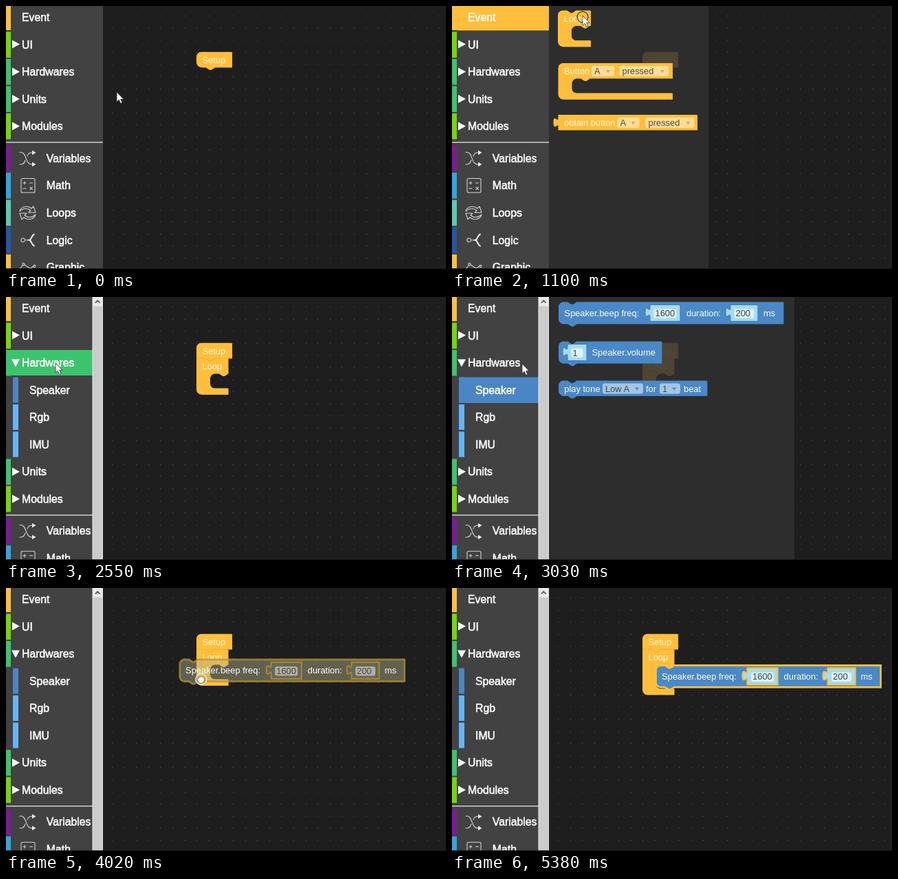
Animation of 640x382 px, one loop 5.75 s. Source, as an HTML page:

```html
<!DOCTYPE html>
<html lang="en">
<head>
<meta charset="utf-8">
<title>Block editor</title>
<style>
html, body { margin: 0; width: 100%; height: 100%; overflow: hidden; background: #1e1e1e; }
svg { display: block; width: 640px; height: 382px; }
text { font-family: "Liberation Sans", Arial, sans-serif; white-space: pre; }
.menu text { font-size: 15.8px; fill: #fff; stroke: #fff; stroke-width: .55px; }
.block text { font-size: 12.9px; }
.icon { fill: none; stroke: #d4d4d4; stroke-width: 1.1; stroke-linecap: round; stroke-linejoin: round; }
</style>
</head>
<body>
<svg id="stage" viewBox="0 0 640 382" xmlns="http://www.w3.org/2000/svg">
  <defs>
    <pattern id="hatch" width="8.8" height="8.8" patternUnits="userSpaceOnUse">
      <rect width="8.8" height="8.8" fill="#aaa"/>
      <path d="M0,0L8.8,8.8M8.8,0L0,8.8" stroke="#cc0" stroke-width=".9"/>
    </pattern>
  </defs>
</svg>
<script>
const LOOP = 5750;
const STEPS = [0, 120, 240, 360, 490, 610, 730, 850, 1100, 1220, 1340, 1460, 1580, 1700,
  1950, 2070, 2190, 2310, 2430, 2550, 2670, 2790, 2910, 3030, 3150, 3270, 3390, 3510,
  3660, 3780, 3900, 4020, 4140, 4260, 4380, 4630, 4750, 4900, 5020, 5140, 5260, 5380];

// time, x, y of the pointer
const PATH = [[0, 161, 125], [610, 98, 20], [730, 98, 20], [850, 190, 17], [1100, 190, 14],
  [1220, 196, 19], [1580, 303, 102], [1700, 305, 103], [1950, 305, 103], [2310, 72, 96],
  [2550, 72, 96], [2790, 77, 136], [2910, 82, 133], [3030, 102, 97], [3390, 186, 36],
  [3510, 186, 36], [3660, 217, 113], [4140, 306, 139], [4380, 311, 141], [4630, 311, 143],
  [4750, 312, 162], [5260, 589, 370], [5380, 640, 400]];

const EVENT = { fill: '#ffbf3c', shade: '#e6ad38', text: '#fff6e0', field: '#ffdc96', ink: '#56503f', mark: '#d3aa5a' };
const SOUND = { fill: '#4a88c8', shade: '#3d72a9', text: '#fff', field: '#a5c5e5', ink: '#3c4650', mark: '#4a88c8',
  num: '#a3dcf6', numField: '#def2fa', rim: '#3f74aa' };
const PICKED = { ...SOUND, stroke: '#ffc235', rim: '#ffc235' };
const GHOST = { fill: 'url(#hatch)', alpha: .46, text: '#fff', stroke: 'rgba(184,146,46,.75)',
  num: 'rgba(115,115,98,.3)', numField: 'rgba(188,188,182,.85)', ink: '#47473f', rim: 'rgba(184,146,46,.75)' };

const stage = document.getElementById('stage');

function add(parent, tag, attrs = {}, content) {
  const el = document.createElementNS('http://www.w3.org/2000/svg', tag);
  for (const k in attrs) el.setAttribute(k, attrs[k]);
  if (content !== undefined) el.textContent = content;
  parent.appendChild(el);
  return el;
}
const group = (parent, x = 0, y = 0, cls = '') =>
  add(parent, 'g', { transform: `translate(${x} ${y})`, class: cls });
const rect = (p, x, y, width, height, fill, rx = 0) => add(p, 'rect', { x, y, width, height, fill, rx });
const path = (p, d, attrs) => add(p, 'path', { d, ...attrs });
const label = (p, x, y, s, fill) => add(p, 'text', { x, y, fill }, s);
const show = (el, on) => el.setAttribute('display', on ? 'inline' : 'none');
const move = (el, x, y) => el.setAttribute('transform', `translate(${x} ${y})`);

// Outline of a block; mouth is the height of the statement opening.
function outline(w, h, { prev, next, mouth, tab, tl = 7, bl = 7 }) {
  let d = `M0,${tl}` + (tl ? `a${tl},${tl} 0 0 1 ${tl},${-tl}` : '');
  if (prev) d += 'H13.2l5.3,3.5h2.6l5.3,-3.5';
  d += `H${w}V${h}`;
  if (mouth) {
    d += `H45.8l-5.3,3.5h-2.6l-5.3,-3.5H26.4a7,7 0 0 0 -7,7v${mouth - 14}a7,7 0 0 0 7,7H${w}v8.8`;
    h += mouth + 8.8;
  }
  if (next) d += 'H26.4l-5.3,3.5h-2.6l-5.3,-3.5';
  d += `H${bl}` + (bl ? `a${bl},${bl} 0 0 1 ${-bl},${-bl}` : '');
  if (tab) d += 'V17.6c0,-8.8 -7,7 -7,-6.6s7,2.2 7,-6.6';
  return d + 'Z';
}

function block(parent, x, y, w, h, look, opts) {
  const g = group(parent, x, y, 'block');
  const d = outline(w, h, opts);
  if (look.shade && !look.stroke) path(g, d, { fill: look.shade, transform: 'translate(.6 .6)' });
  path(g, d, { fill: look.fill, 'fill-opacity': look.alpha || 1, stroke: look.stroke || 'none', 'stroke-width': 2.6 });
  return g;
}

function menuField(g, x, y, w, s, look) {
  rect(g, x, y, w, 15, look.field, 3);
  label(g, x + 4, y + 12, s, look.ink);
  path(g, `M${x + w - 12},${y + 6}h6l-3,4.5z`, { fill: look.mark });
}

function number(g, x, w, s, look) {
  const n = group(g, x, 4);
  path(n, outline(w, 24, { tab: true, tl: 0, bl: 0 }),
    { fill: look.num, stroke: look.rim, 'stroke-width': look.stroke ? 2.2 : 1 });
  rect(n, 5.5, 6, w - 11, 13.5, look.numField, 3);
  label(n, 7.5, 17, s, look.ink);
}

function beep(parent, x, y, look) {
  const g = block(parent, x, y, 327, 31.7, look, { prev: true, next: true });
  label(g, 8.3, 20.5, 'Speaker.beep freq:', look.text);
  number(g, 133, 44, '1600', look);
  label(g, 186, 20.5, 'duration:', look.text);
  number(g, 250, 40, '200', look);
  label(g, 298, 20.5, 'ms', look.text);
  return g;
}

function loopBlock(parent, x, y, look, mouth, joined) {
  const g = block(parent, x, y, joined ? 46 : 47.5, 22, look, { prev: true, mouth, tl: joined ? 0 : 7 });
  label(g, 8.5, 16, 'Loop', look.text);
  return g;
}

// Workspace
rect(stage, 0, 0, 640, 382, '#1e1e1e');
const dots = group(stage);
for (let x = 154; x < 640; x += 17.6)
  for (let y = 14; y < 382; y += 17.6) rect(dots, Math.round(x), Math.round(y), 1, 1, '#5c5c5c');

const work = group(stage);
const loopShort = loopBlock(work, 277, 89, EVENT, 21.5, true);
const loopTall = loopBlock(work, 277, 89, EVENT, 35.2, true);
function setupBlock(bl) {
  const g = block(work, 277, 66.8, 51.5, 22, EVENT, { next: true, bl });
  label(g, 8.5, 15.8, 'Setup', EVENT.text);
  return g;
}
const setupFree = setupBlock(7), setupJoined = setupBlock(0);
const placedBeep = beep(work, 296.6, 112.4, PICKED);

// Flyouts
function flyout(w) {
  const g = group(stage);
  add(g, 'rect', { x: 141, y: 0, width: w, height: 382, fill: '#303030', 'fill-opacity': .86 });
  return g;
}
const eventFly = flyout(232);
loopBlock(eventFly, 154, 6.5, EVENT, 21.5);
const btn = block(eventFly, 154.5, 83, 166, 22, EVENT, { mouth: 21.5 });
label(btn, 8.5, 16, 'Button', EVENT.text);
menuField(btn, 48.5, 4, 33, 'A', EVENT);
menuField(btn, 89, 4, 71.5, 'pressed', EVENT);
const obtain = block(eventFly, 154.5, 158, 202, 22, EVENT, { tab: true, tl: 0, bl: 0 });
label(obtain, 8.5, 16, 'obtain button', EVENT.text);
menuField(obtain, 86, 4, 32, 'A', EVENT);
menuField(obtain, 127, 4, 71, 'pressed', EVENT);

const soundFly = flyout(357);
beep(soundFly, 155, 7.3, SOUND);
const flyPicked = beep(soundFly, 155, 7.3, PICKED);
const volume = block(soundFly, 155, 64.5, 150, 31.7, SOUND, { prev: true, next: true });
number(volume, 13, 28, '1', SOUND);
label(volume, 48.5, 20.5, 'Speaker.volume', SOUND.text);
const tone = block(soundFly, 155, 121.5, 216, 22, SOUND, { prev: true, next: true });
label(tone, 8.3, 16, 'play tone', SOUND.text);
menuField(tone, 64, 4, 59, 'Low A', SOUND);
label(tone, 127, 16, 'for', SOUND.text);
menuField(tone, 147, 4, 30, '1', SOUND);
label(tone, 182, 16, 'beat', SOUND.text);

const dragLoop = loopBlock(stage, 0, 0, GHOST, 21.5);
const dragBeep = beep(stage, 0, 0, GHOST);

// Side menu
const menu = group(stage, 0, 0, 'menu');
rect(menu, 0, 0, 141, 382, '#424242');
const eventMark = rect(menu, 7, 0, 134, 35.5, '#ffbf3c');
const hardMark = rect(menu, 7, 77, 134, 37, '#3cc46c');

function row(p, y, name, color, x = 23) {
  rect(p, 0, y - 18.5, 7, 37.5, color);
  label(p, x, y + 5.7, name);
}
const arrow = (p, y) => path(p, `M9,${y - 6}L20,${y}L9,${y + 6}z`, { fill: '#fff' });

row(menu, 16, 'Event', '#ffbf3c');
row(menu, 56, 'UI', '#74d60a');
arrow(menu, 55.5);
row(menu, 95.5, 'Hardwares', '#3cc46c');
const closedArrow = arrow(menu, 95.5);
const openArrow = path(menu, 'M8,90.5H20L14,101.5z', { fill: '#fff' });

const subs = group(menu);
const speakerMark = rect(subs, 10, 116.5, 116, 37.5, '#4a86c6');
['Speaker', 'Rgb', 'IMU'].forEach((name, i) => {
  const y = 135 + i * 39.5;
  rect(subs, 10, y - 18.5, 8, 37, i ? '#64b5fa' : '#4a86c6');
  label(subs, 34, y + 5.7, name);
});

const lower = group(menu);
row(lower, 135, 'Units', '#3cc46c');
arrow(lower, 135);
row(lower, 174.5, 'Modules', '#74d60a');
arrow(lower, 174.5);
rect(lower, 0, 197.3, 141, 1.5, '#d0d0d0');
[['Variables', '#7d1a98'], ['Math', '#2ea6e0'], ['Loops', '#58cab4'], ['Logic', '#2456a2'], ['Graphic', '#ffbf3c']]
  .forEach(([name, color], i) => row(lower, 221 + i * 39.6, name, color, 58.8));

const icon = d => path(lower, d, { class: 'icon' });
icon('M20,212.5h2c8,0 6,17.5 15,17.5h2M20,230h2c4,0 5,-3 6,-6M31,218c1,-3 3,-5 6,-5h2');
path(lower, 'M38,209.8l5.5,3.2l-5.5,3.2zM38,226.8l5.5,3.2l-5.5,3.2z', { fill: '#eee' });
icon('M24,250.5h16q2,0 2,2v16.5q0,2 -2,2h-16q-2,0 -2,-2v-16.5q0,-2 2,-2zM25,257h4M27,255v4M34.5,257h4M25,265h4M35,263.2l3.4,3.4M38.4,263.2l-3.4,3.4');
icon('M20,298C22,291 31,289 37,294L40,291L43,300H33L36,297C31,293 25,294 20,298zM43,303C41,310 32,312 26,307L23,310L20,301H30L27,304C32,308 38,307 43,303z');
icon('M27.5,340a2.8,2.8 0 1 1 -5.6,0a2.8,2.8 0 1 1 5.6,0M27.5,340h6');
path(lower, 'M41,331.5c-4,1.5 -3.5,7.5 -7,8.5c3.5,1 3,7 7,8.5',
  { fill: 'none', stroke: '#f4f4f4', 'stroke-width': 2, 'stroke-linecap': 'round' });
icon('M20,382l4,-5M27,376l8,5M36,381l3.5,-3M27,375a1.6,1.6 0 1 1 -3.2,0a1.6,1.6 0 1 1 3.2,0M43,378a1.6,1.6 0 1 1 -3.2,0a1.6,1.6 0 1 1 3.2,0');

const bar = group(menu);
rect(bar, 125.5, 0, 15.5, 382, '#e9e9e9');
rect(bar, 126.5, 13.5, 13.5, 369, '#cbcbcb');
path(bar, 'M129.8,8.5l3.4,-3.4l3.4,3.4', { fill: 'none', stroke: '#505050', 'stroke-width': 1.6 });
rect(stage, 0, 381, 640, 1, '#1c1115');

// Pointer
const pointer = group(stage);
const ring = add(pointer, 'circle', { cx: 0, cy: 2, r: 8, fill: 'none', 'stroke-width': 1.3 });
const tip = path(pointer, 'M0,0V14.2L3.3,11.2L5.6,16.4L8,15.3L5.7,10.3H10Z',
  { fill: '#fff', stroke: '#222', 'stroke-width': .7 });
const hand = path(pointer, 'M-5,-1q1,-2 2.2,-.6v-1.6q1.3,-1.6 2.5,0q1.3,-1.5 2.5,.2q1.4,-1 2.3,.6v4.4l-1.5,3.5h-6l-2,-3.5z',
  { fill: '#fff', stroke: '#333', 'stroke-width': .6 });

function pointerAt(t) {
  let i = 0;
  while (i < PATH.length - 2 && t >= PATH[i + 1][0]) i++;
  const [t0, x0, y0] = PATH[i], [t1, x1, y1] = PATH[i + 1];
  const k = Math.min(1, (t - t0) / (t1 - t0));
  return [x0 + (x1 - x0) * k, y0 + (y1 - y0) * k];
}

function draw(time) {
  const t = STEPS.filter(s => s <= time).pop();
  const within = (a, b) => t >= a && t < b;
  const [x, y] = pointerAt(t);
  const open = t >= 2430, joined = t >= 1950, done = t >= 4630;
  const dragging = within(1220, 1950) || within(3780, 4630);

  show(setupFree, !joined);
  show(setupJoined, joined);
  show(loopShort, joined && !done);
  show(loopTall, done);
  show(placedBeep, done);

  show(eventFly, within(730, 1220));
  show(soundFly, within(2910, 3660));
  show(flyPicked, t === 3510);
  show(eventMark, within(610, 1220));
  show(hardMark, within(2430, 2790));
  show(speakerMark, within(2790, 3660));

  show(dragLoop, within(1220, 1950));
  move(dragLoop, x - 35.2, y - 9);
  show(dragBeep, within(3660, 4630));
  if (t === 3660) move(dragBeep, 160.3, 28.8);
  else move(dragBeep, x - 31, y - 28.6);

  show(subs, open);
  show(bar, open);
  show(openArrow, open);
  show(closedArrow, !open);
  move(lower, 0, open ? 118.7 : 0);

  move(pointer, x, y);
  show(pointer, t < 5380);
  show(tip, !dragging);
  show(hand, dragging);
  show(ring, dragging || [610, 1100, 2430, 2790, 3510, 3660].includes(t));
  ring.setAttribute('cy', dragging ? 0 : 2);
  ring.setAttribute('stroke', t === 1100 || t === 610 ? '#4a4030' : '#f0f0f0');
}

const start = performance.now();
function tick() {
  draw((performance.now() - start) % LOOP);
  requestAnimationFrame(tick);
}
draw(0);
tick();
</script>
</body>
</html>
```
